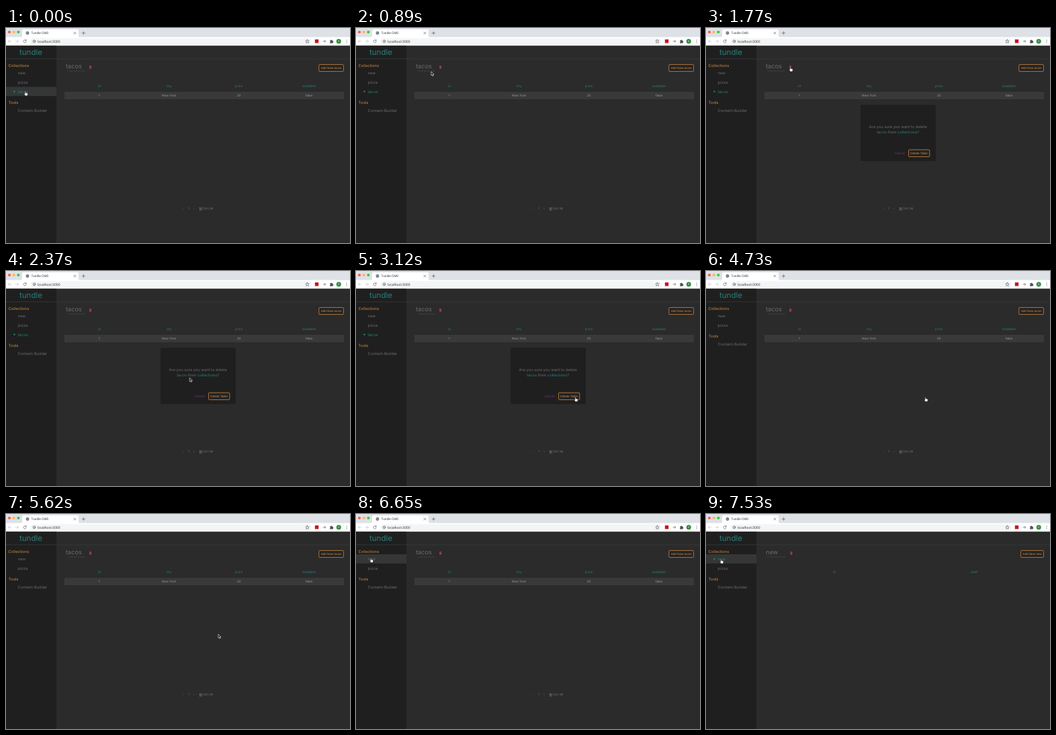
Recreate the animation shown at these times as an HTML page. Size 512 by 320 pixels, loop 8 s.

```html
<!DOCTYPE html>
<html lang="en">
<head>
<meta charset="utf-8">
<title>Collections dashboard</title>
<style>
html, body { margin: 0; width: 100%; height: 100%; overflow: hidden; background: #2b2b2b; }
svg { display: block; width: 100vw; height: 100vh; }
text { font: 5.85px Inter, sans-serif; fill: #6b6b6b; text-rendering: geometricPrecision; white-space: pre; }
.mid { text-anchor: middle; }
.teal { fill: #287f79; }
.orange { fill: #cf8b42; }
.purple { fill: #7d2b80; }
.logo { font-size: 11.6px; }
.title { font-size: 9.2px; }
.sub { font-size: 3.8px; fill: #4b4b4b; }
.head text { font-size: 4.8px; }
.cell text { font-size: 4.6px; fill: #9b9b9b; }
.ask { font-size: 5.76px; }
.pages text { font-size: 4.3px; fill: #8a8a8a; }
.pages .teal { fill: #2f9990; }
.pages .purple { fill: #8a2f8c; }
.button rect { fill: #222; stroke: #cf8b42; stroke-width: .8; }
.button text { font: 4.6px "Liberation Sans", Arial, sans-serif; fill: #cf8b42; text-anchor: middle; }
.chrome text { font: 5.1px Roboto, sans-serif; fill: #3c4043; }
.icon { fill: none; stroke: #5f6368; stroke-width: .7; stroke-linecap: round; }
.faint { stroke: #bdc1c6; }
.cursor path { stroke-width: .6; stroke-linejoin: round; }
</style>
</head>
<body>
<svg viewBox="0 0 512 320" preserveAspectRatio="none">
  <defs>
    <g id="bin">
      <path d="M0 .6h3.6M1.2 0h1.2" stroke="#a83c4c" stroke-width=".7"/>
      <path d="M.3 1.2h3l-.2 3.2h-2.6z" fill="#a83c4c"/>
    </g>
  </defs>

  <g class="chrome">
    <rect width="512" height="14" fill="#dee1e6"/>
    <rect y="13.5" width="512" height="13" fill="#fff"/>
    <path d="M22 14q2 0 2-2V4q0-2 2-2h80q2 0 2 2v8q0 2 2 2z" fill="#fff"/>
    <circle cx="5" cy="6" r="2.1" fill="#fc5b57"/>
    <circle cx="11.7" cy="6" r="2.1" fill="#fdbc40"/>
    <circle cx="18.4" cy="6" r="2.1" fill="#34c84a"/>
    <circle cx="32" cy="7.5" r="2.4" fill="#5f6368"/>
    <path d="M30.6 6.6l1.4 .6-.5 1.3M32.4 5.7l1 .9M32.6 8.7l.9-.7" stroke="#fff" stroke-width=".6" fill="none"/>
    <text x="37.5" y="9.3" style="font-size:4.8px">Tundle CMS</text>
    <path class="icon" d="M101 6l3 3M104 6l-3 3M113.2 7.5h4.4M115.4 5.3v4.4"/>
    <rect x="36" y="15.3" width="419" height="9.4" rx="4.7" fill="#f4f5f6"/>
    <path class="icon faint" d="M3.5 19.8h4.3M5.4 17.9l-1.9 1.9 1.9 1.9M14.2 19.8h4.3M16.6 17.9l1.9 1.9-1.9 1.9"/>
    <path class="icon" d="M29.8 18.6a2.1 2.1 0 1 0 .3 1.8M30.1 17.4v1.5h-1.5"/>
    <circle class="icon" cx="42" cy="19.8" r="1.9"/>
    <path class="icon" d="M42 19.7v1M42 18.7v.1"/>
    <text x="47" y="21.6">localhost:3000</text>
    <path class="icon" d="M448.5 17.2l.8 1.7 1.9.2-1.4 1.3.4 1.9-1.7-1-1.7 1 .4-1.9-1.4-1.3 1.9-.2z"/>
    <rect x="459.8" y="17" width="5.4" height="5.4" fill="#c5181e"/>
    <path class="icon" d="M472 19.8h3.6M474.2 18.2l1.6 1.6-1.6 1.6"/>
    <path d="M482 18.4h1.4a.9 .9 0 0 1 1.8 0h1.3v1.4a.9 .9 0 0 1 0 1.8v.8h-4.5v-1.2a.8 .8 0 0 0 0-1.6z" fill="#4a4d51"/>
    <circle cx="495.2" cy="19.8" r="3.5" fill="#2f8a3c"/>
    <text class="mid" x="495.2" y="21.2" style="font-size:4px;fill:#fff">C</text>
    <path class="icon" d="M507 17.9v.1M507 19.8v.1M507 21.7v.1" style="stroke-width:1"/>
  </g>

  <rect y="26.5" width="512" height="293.5" fill="#2b2b2b"/>
  <rect y="26.5" width="75" height="293.5" fill="#1f1f1f"/>
  <rect y="45.5" width="512" height=".8" fill="#3b3b3b"/>
  <text class="logo teal mid" x="37" y="39.6">tundle</text>

  <rect id="hover" width="75" height="13.6" fill="#353737"/>
  <text class="orange" x="3.6" y="57.5">Collections</text>
  <text id="linkNew" x="17.6" y="69">new</text>
  <text x="17.6" y="82.7">pizza</text>
  <text id="linkTacos" class="teal" x="17.6" y="96.5">tacos</text>
  <circle id="dot" cx="12.5" r="1.2" fill="#287f79"/>
  <g id="tools">
    <text class="orange" x="3.6" y="113.2">Tools</text>
    <text x="17.6" y="124.5">Content-Builder</text>
  </g>

  <g id="tacosPage">
    <text class="title" x="89" y="60.4">tacos</text>
    <text class="sub" x="91" y="65.4">1 entries found</text>
    <use href="#bin" x="123.8" y="56"/>
    <g class="button">
      <rect x="465.8" y="54.4" width="36.6" height="10.2" rx="1"/>
      <text x="484.1" y="61.2">Add New tacos</text>
    </g>
    <g class="head">
      <text class="teal mid" x="139" y="88.1">id</text>
      <text class="teal mid" x="242.6" y="88.1">city</text>
      <text class="teal mid" x="346.6" y="88.1">price</text>
      <text class="teal mid" x="451" y="88.1">available</text>
    </g>
    <rect x="87" y="95" width="416" height="11" fill="#393939"/>
    <g class="cell">
      <text class="mid" x="138.6" y="102">1</text>
      <text class="mid" x="242.6" y="102">New York</text>
      <text class="mid" x="346.6" y="102">20</text>
      <text class="mid" x="451" y="102">false</text>
    </g>
    <g class="pages">
      <text class="mid" x="264" y="269.8" style="fill:#4d4d4d">&lt;</text>
      <text class="teal mid" x="272" y="269.8">1</text>
      <text class="purple mid" x="280" y="269.8">&gt;</text>
      <text x="287.6" y="269.8" style="font-size:3.9px"><tspan fill="#c4c4c4" text-decoration="underline">10</tspan> | 20 / 50</text>
    </g>
  </g>

  <g id="newPage">
    <text class="title" x="89" y="60.4">new</text>
    <text class="sub" x="91" y="65.4">0 entries found</text>
    <use href="#bin" x="125.2" y="56"/>
    <g class="button">
      <rect x="468.6" y="54.4" width="33.8" height="10.2" rx="1"/>
      <text x="485.5" y="61.2">Add New new</text>
    </g>
    <g class="head">
      <text class="teal mid" x="191" y="88.1">id</text>
      <text class="teal mid" x="399" y="88.1">asdf</text>
    </g>
  </g>

  <g id="modal">
    <rect x="230" y="114.3" width="112" height="83.8" rx="2" fill="#1f1f1f"/>
    <text class="ask mid" x="285.7" y="148.5">Are you sure you want to delete</text>
    <text class="ask mid" x="285.7" y="157.2"><tspan class="teal">tacos</tspan> from <tspan class="teal">collections</tspan>?</text>
    <text id="cancel" class="purple" x="280.6" y="188" style="font-size:4.9px">cancel</text>
    <circle id="spinner" cx="292.7" cy="186.6" r="2.5" fill="none" stroke="#2a8f87" stroke-width="1" stroke-dasharray="11.8 3.9"/>
    <g class="button">
      <rect x="301.6" y="181.2" width="31.2" height="10.4" rx="1"/>
      <text x="317" y="188.1">Delete Table</text>
    </g>
  </g>

  <g id="cursor" class="cursor">
    <path id="arrow" d="M0 0v5.6l1.3-1.2 .9 2 1-.4-.9-2h1.8z" fill="#111" stroke="#fff"/>
    <path id="hand" d="M-.7 .5q.6-.9 1.2 0l.3 2q.7-.5 1 .1 .7-.3 1 .2 .9-.2 1 .6 .2 1.800-.7 3.500h-2.900q-1-1.500-2-2.700 .2-.9 1.400-.1z" fill="#fff" stroke="#111"/>
  </g>
</svg>
<script>
const LOOP = 8000, TICK = 147.5, FIRST = 300;
const el = id => document.getElementById(id);
const show = (id, on) => el(id).style.display = on ? "" : "none";

// Cursor route: time, x, y
const route = [
  [153, 28.6, 94], [600, 62, 80], [890, 112, 65], [1040, 132, 60], [1330, 125.4, 58],
  [1775, 125.4, 58], [2070, 175, 95], [2370, 275, 160], [2670, 329, 188], [2970, 326.4, 187.6],
  [5033, 326.4, 187.6], [5610, 316, 179],
  [5763, 316, 179], [6060, 240, 140], [6350, 90, 85], [6500, 40, 70], [6640, 21.9, 65.4], [6937, 22.2, 67]
];

function cursorAt(t) {
  const next = route.findIndex(k => k[0] > t);
  if (next === 0) return route[0].slice(1);
  if (next < 0) return route.at(-1).slice(1);
  const [t0, x0, y0] = route[next - 1], [t1, x1, y1] = route[next];
  const p = (t - t0) / (t1 - t0);
  return [x0 + (x1 - x0) * p, y0 + (y1 - y0) * p];
}

function draw(t) {
  const within = (from, to) => t >= from && t < to;
  const stepped = FIRST + Math.floor((t - FIRST + 6) / TICK) * TICK;
  const [x, y] = cursorAt(stepped);
  const deleted = t >= 4730, opened = t >= 7380, loading = t >= 3270;

  const row = Math.floor((y - 60) / 13.8);
  const onLink = x < 75 && row >= 0 && row < (deleted ? 2 : 3);
  show("hover", onLink);
  el("hover").setAttribute("y", 60 + row * 13.8);

  show("linkTacos", !deleted);
  show("dot", !deleted || opened);
  el("dot").setAttribute("cy", opened ? 67 : 94.5);
  el("linkNew").setAttribute("class", opened ? "teal" : "");
  el("tools").setAttribute("transform", `translate(0 ${deleted ? -13.8 : 0})`);

  show("tacosPage", !opened);
  show("newPage", opened);
  show("modal", within(1770, 4730));
  show("cancel", !loading);
  show("spinner", loading);
  el("spinner").setAttribute("transform", `rotate(${stepped * .36} 292.7 186.6)`);

  const hand = onLink || within(1480, 1920) || within(2670, 5180);
  show("hand", hand);
  show("arrow", !hand);
  el("cursor").setAttribute("transform", `translate(${x} ${y})`);
}

function frame() {
  draw(performance.now() % LOOP);
  requestAnimationFrame(frame);
}
frame();
</script>
</body>
</html>
```
